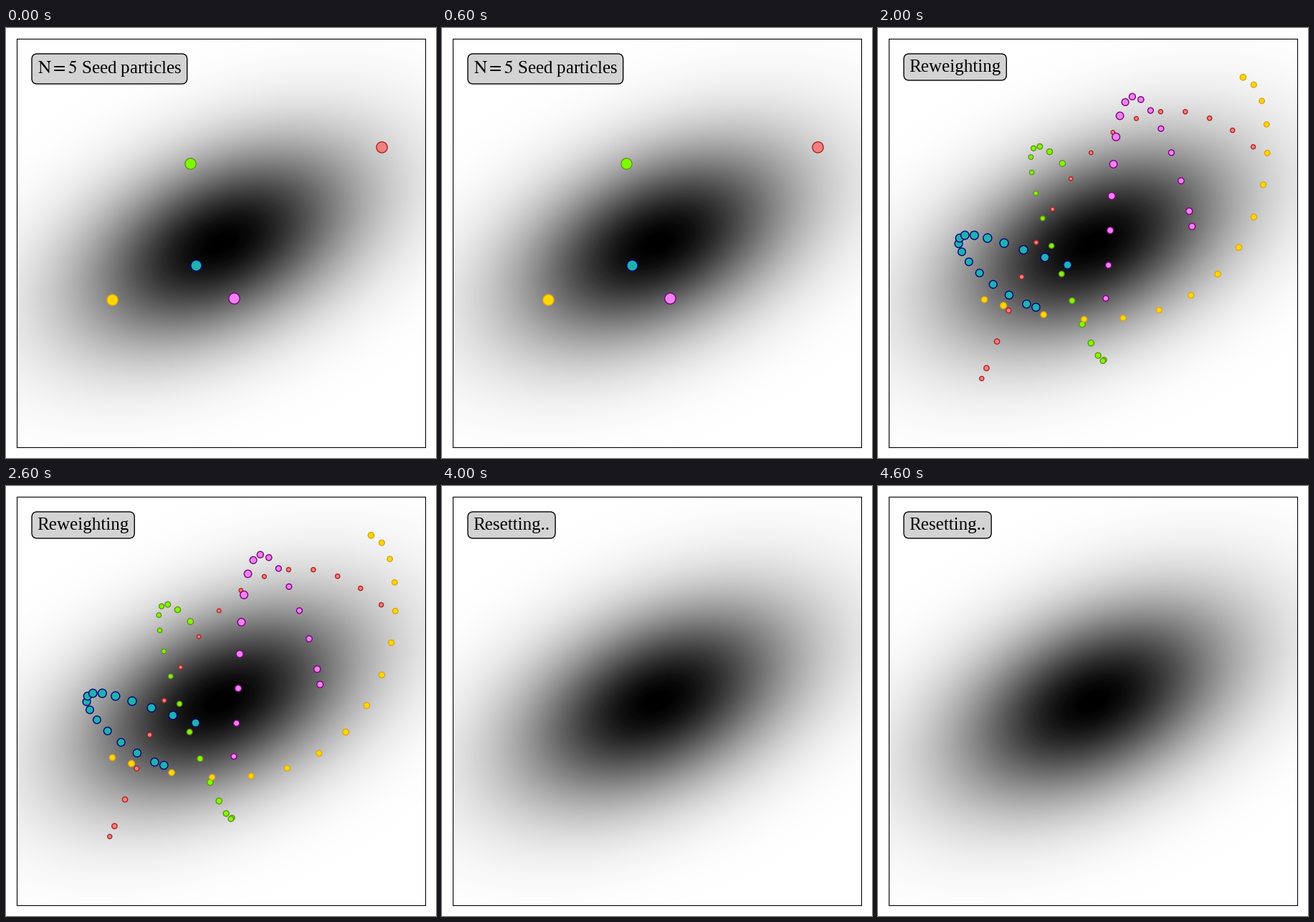
Write a matplotlib script that moves like this. It is 600x600 px and loops after 5000 ms.

```python
import numpy as np
import matplotlib.pyplot as plt
from matplotlib.animation import FuncAnimation

plt.rcParams.update({"font.family": "Liberation Serif", "mathtext.fontset": "stix"})

UNIT = 95.0   # pixels per unit of the density
HALF = 285    # half the plot width in pixels
STEPS = 14

COV = np.array([[2.0, 0.6], [0.6, 1.0]])
PREC = np.linalg.inv(COV)
VAR, MODES = np.linalg.eigh(COV)


def orbit(first, last, dt):
    """Leapfrog positions from first to last, led by the half-step start,
    and the potential change per step at each of them."""
    theta = np.arccos(1 - dt**2 / (2 * VAR))
    k = np.arange(-1, STEPS + 2)[:, None]
    a, b = np.array(first) @ MODES, np.array(last) @ MODES
    q = (a * np.sin((STEPS - k) * theta) + b * np.sin(k * theta)) / np.sin(STEPS * theta)
    q = q @ MODES.T
    move = (q[2:] - q[:-2]) / 2
    rate = np.sum((q[1:-1] @ PREC) * move, axis=1) / UNIT**2
    path = np.vstack([(q[0] + q[1]) / 2, q[1:-1]])
    return path, np.append(0, rate)


# fill, edge, first and last point, step size, base diameter in pixels
CHAINS = {
    "red": ("lightcoral", "firebrick", (-148.6, -174.6), (223.6, 134.2), 0.2261, 7.5),
    "green": ("lawngreen", "olivedrab", (13.8, -164.5), (-42.7, 111.0), 0.2261, 8.7),
    "teal": ("lightseagreen", "navy", (-92.6, -85.2), (-35.5, -30.6), 0.2261, 12.5),
    "violet": ("violet", "purple", (134.2, 44.4), (17.9, -77.3), 0.2261, 10.4),
    "gold": ("gold", "goldenrod", (-125.0, -87.3), (209.4, 231.2), 0.2548, 9.8),
}
ORBITS = {name: orbit(*c[2:5]) for name, c in CHAINS.items()}
SEEDS = [("red", 15), ("green", 15), ("teal", 15), ("violet", 15), ("gold", 0)]
PICKS = [("red", 4), ("teal", 13), ("teal", 15), ("violet", 1), ("violet", 11)]

fig = plt.figure(figsize=(6, 6), dpi=100)
ax = fig.add_axes([0.025, 0.025, 0.95, 0.95])
ax.set(xlim=(-HALF, HALF), ylim=(-HALF, HALF), xticks=[], yticks=[])

side = (np.arange(2 * HALF) + 0.5 - HALF) / UNIT
x, y = np.meshgrid(side, side)
energy = (PREC[0, 0] * x**2 + 2 * PREC[0, 1] * x * y + PREC[1, 1] * y**2) / 2
ax.imshow(np.exp(-energy), cmap="binary", vmin=0, vmax=1, origin="lower",
          extent=(-HALF, HALF, -HALF, HALF))

label = ax.text(0.05, 0.95, "", transform=ax.transAxes, fontsize=18, va="top",
                bbox=dict(boxstyle="round", facecolor="lightgray"))
shown = []


def beads(name, points, line="none"):
    fill, edge = CHAINS[name][:2]
    shown.extend(ax.plot(*points.T, color=fill, linestyle=line, marker="o", markersize=11,
                         markerfacecolor=fill, markeredgecolor=edge, markeredgewidth=1))


def draw_picks(picks):
    for name, i in picks:
        beads(name, ORBITS[name][0][i:i + 1])


def draw_paths():
    for name, (path, _) in ORBITS.items():
        beads(name, path, "-")


def draw_weights():
    for name, (path, rate) in ORBITS.items():
        fill, edge, *_, size = CHAINS[name]
        width = (size * np.exp(-rate / 4) - 1.4) * 0.72
        shown.append(ax.scatter(*path.T, s=width**2, c=fill, edgecolors=edge,
                                linewidths=1, zorder=2))


STAGES = [
    (r"$\mathrm{N}=5$ Seed particles", lambda: draw_picks(SEEDS)),
    (r"$\mathrm{T}=15$ Leapfrogs", draw_paths),
    ("Reweighting", draw_weights),
    (r"Resample $\mathrm{N}=5$", lambda: draw_picks(PICKS)),
    ("Resetting..", lambda: None),
]


def update(i):
    while shown:
        shown.pop().remove()
    text, draw = STAGES[i]
    label.set_text(text)
    draw()
    return [label]


anim = FuncAnimation(fig, update, frames=len(STAGES), interval=1000,
                     repeat=True, repeat_delay=0, blit=False)
plt.show()
```
